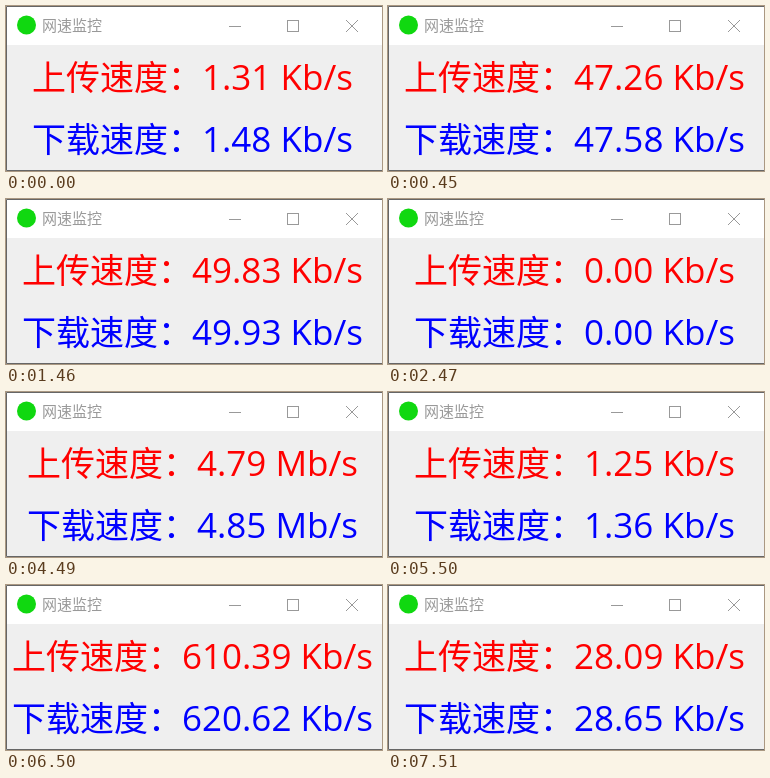
Animation, 376 px wide and 165 px high, one loop 8000 ms. Source, as an HTML page:

```html
<!DOCTYPE html>
<html lang="zh-CN">
<head>
<meta charset="utf-8">
<title>网速监控</title>
<style>
  html, body { margin: 0; overflow: hidden; }
  svg { display: block; width: 376px; height: 165px; background: #efefef; }
  text { font-family: "Noto Sans CJK SC", "Noto Sans CJK", sans-serif; white-space: pre; }
  .row { font-size: 34px; text-anchor: middle; }
  .value { font: 35px "Open Sans", "Noto Sans", sans-serif; }
  .controls { fill: none; stroke: #999; shape-rendering: crispEdges; }
</style>
</head>
<body>
<svg viewBox="0 0 376 165">
  <rect width="376" height="39" fill="#fff"/>
  <circle cx="20.5" cy="19" r="9.5" fill="#10d810"/>
  <text x="36" y="25" font-size="15" fill="#999">网速监控</text>
  <g class="controls">
    <path d="M223 20.5h12M281.5 14.5h11v11h-11z"/>
    <path d="M340 14l12 12M352 14l-12 12" shape-rendering="auto"/>
  </g>
  <path d="M376 .5H.5V164.5H376" fill="none" stroke="#666"/>
  <text class="row" x="186.5" y="84" fill="#f00">上传速度：<tspan class="value" id="up"></tspan></text>
  <text class="row" x="186.5" y="146" fill="#00f">下载速度：<tspan class="value" id="down"></tspan></text>
</svg>
<script>
  const DURATION = 8000;
  // Start time in ms, upload, download, unit
  const readings = [
    [0, '1.31', '1.48', 'Kb/s'],
    [450, '47.26', '47.58', 'Kb/s'],
    [1460, '49.83', '49.93', 'Kb/s'],
    [2470, '0.00', '0.00', 'Kb/s'],
    [3480, '0.26', '0.38', 'Kb/s'],
    [4490, '4.79', '4.85', 'Mb/s'],
    [5500, '1.25', '1.36', 'Kb/s'],
    [6500, '610.39', '620.62', 'Kb/s'],
    [7510, '28.09', '28.65', 'Kb/s']
  ];
  const up = document.getElementById('up');
  const down = document.getElementById('down');
  const start = performance.now();
  let shown;

  function draw() {
    const time = (performance.now() - start) % DURATION;
    const reading = readings.findLast(([from]) => from <= time);
    if (reading !== shown) {
      const [, upload, download, unit] = shown = reading;
      up.textContent = `${upload} ${unit}`;
      down.textContent = `${download} ${unit}`;
    }
    requestAnimationFrame(draw);
  }
  draw();
</script>
</body>
</html>
```
